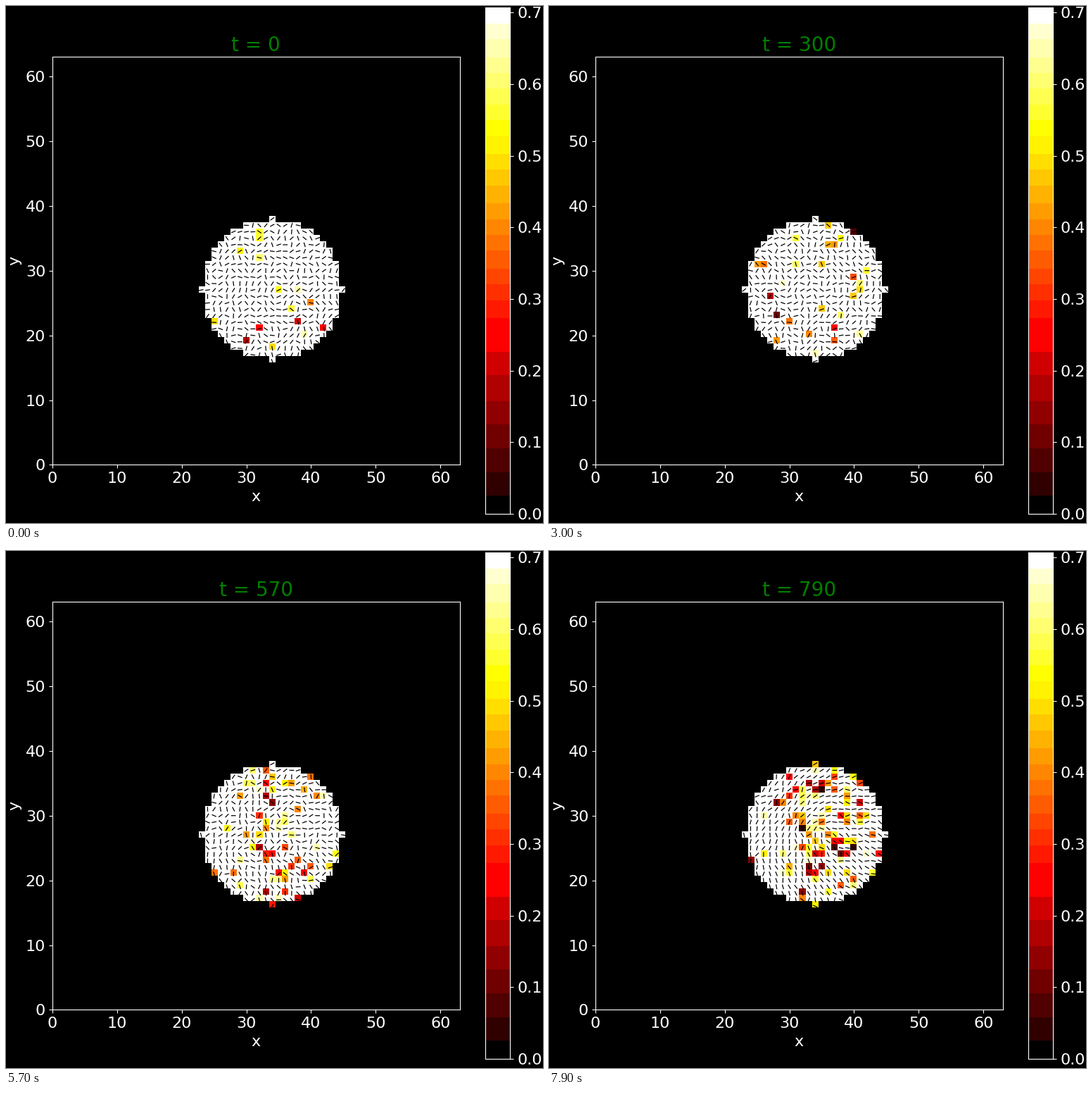
Recreate the animation shown at these times as a matplotlib script. Size 763 px wide and 734 px high, loop 8 s.

```python
import numpy as np
import matplotlib.pyplot as plt
from matplotlib.animation import FuncAnimation
from matplotlib.collections import LineCollection
from matplotlib.colors import ListedColormap

W, H, DPI = 763, 734, 100
FRAMES, INTERVAL = 80, 100
N = 64
S_MAX = 1 / np.sqrt(2)
CENTRE, RADIUS = (34, 27), 11
DEFECT = (35, 28)

plt.rcParams.update({
    "font.family": "DejaVu Sans", "font.size": 16, "text.color": "white",
    "axes.edgecolor": "white", "axes.labelcolor": "white",
    "axes.facecolor": "black", "figure.facecolor": "black",
    "xtick.color": "white", "ytick.color": "white",
})


def stepped_hot(n=719):
    """The 'hot' map with each channel reduced to a few flat steps."""
    rgb = plt.get_cmap("hot")(np.linspace(0, 1, n))[:, :3] * 255
    for ch in (0, 2):
        k = np.floor(rgb[:, ch] / 32)
        rgb[:, ch] = np.where(k == 0, 0, np.where(k >= 7, 255, 32 * k + 16))
    g = rgb[:, 1]
    k = np.floor((g - 15) / 21.8)
    rgb[:, 1] = np.where(k < 0, 0, np.where(k >= 11, 255, 15 + 21.8 * (k + 0.5)))
    return ListedColormap(rgb / 255)


def add_axes(x0, y0, x1, y1):
    """Axes from a pixel box measured from the top left."""
    return fig.add_axes([x0 / W, 1 - y1 / H, (x1 - x0) / W, (y1 - y0) / H])


cmap = stepped_hot()
fig = plt.figure(figsize=(W / DPI, H / DPI), dpi=DPI)

# Droplet cells
yy, xx = np.mgrid[0:N, 0:N]
inside = (xx - CENTRE[0]) ** 2 + (yy - CENTRE[1]) ** 2 <= RADIUS ** 2
cx, cy = xx[inside], yy[inside]
cells = np.column_stack([cx, cy])
dx, dy = cx - DEFECT[0], cy - DEFECT[1]
ordered = np.arctan2(dy - 0.1, dx + 0.1) / 2 - np.radians(15)

# The 64 cells are fitted into the range 0 to 63
ax = add_axes(65.9, 72.45, 644.8, 651.4)
field = ax.imshow(np.zeros((N, N)), cmap=cmap, vmin=0, vmax=S_MAX,
                  origin="lower", interpolation="nearest", aspect="auto",
                  extent=(0, N - 1, 0, N - 1))
ax.set_xticks(range(0, N, 10))
ax.set_yticks(range(0, N, 10))
ax.set_xlabel("x")
ax.set_ylabel("y")
title = ax.set_title("t = 0", fontsize=20, color="green")
rods = ax.add_collection(LineCollection([], colors="black", linewidths=0.9),
                         autolim=False)

# Colour scale
bar = add_axes(681.3, 2, 716.4, 721)
bar.imshow(np.linspace(0, S_MAX, 719)[:, None], cmap=cmap, origin="lower",
           aspect="auto", interpolation="nearest", extent=(0, 1, 0, S_MAX))
bar.set_xticks([])
bar.yaxis.tick_right()
bar.set_yticks(np.arange(8) / 10)
bar.set_yticklabels([f"{v / 10:.1f}" for v in range(8)])


def update(i):
    rng = np.random.default_rng(900 + i)
    p = i / (FRAMES - 1)

    # Low-order cells grow in number and gather round the defect
    spread = 2 * (14 - 7 * p) ** 2
    weight = np.exp(-(2 * dx ** 2 + 0.4 * dy ** 2) / spread)
    count = int(15 + 75 * p ** 1.7 + rng.integers(-2, 3))
    picked = rng.choice(len(cx), count, replace=False, p=weight / weight.sum())
    order = np.full(len(cx), S_MAX)
    order[picked] = 0.69 * rng.random(count) ** 0.55
    grid = np.zeros((N, N))
    grid[inside] = order
    field.set_data(grid)

    # Rods settle from disorder into the director field
    noise = 1.7 - 1.35 * p ** 1.3
    angle = ordered + rng.normal(0, noise, len(cx))
    half = 0.37 * np.column_stack([np.cos(angle), np.sin(angle)])
    rods.set_segments(np.stack([cells - half, cells + half], axis=1))
    title.set_text(f"t = {10 * i}")
    return field, rods, title


anim = FuncAnimation(fig, update, frames=FRAMES, interval=INTERVAL,
                     repeat=True, repeat_delay=0, blit=False)
plt.show()
```
